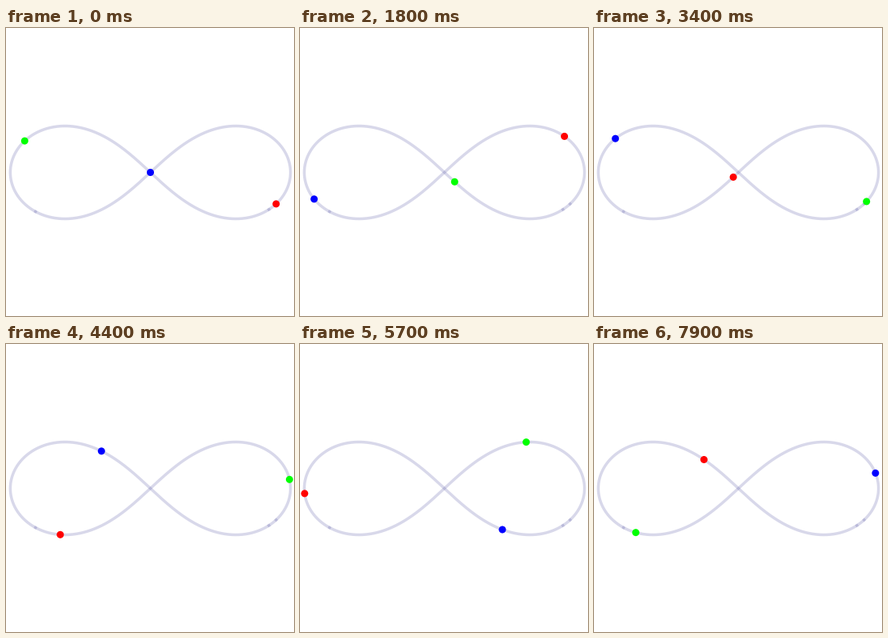
Recreate the animation shown at these times as a matplotlib script. Size 360 by 360 pixels, loop 8 s.

```python
"""Three equal masses chasing each other along the figure-eight orbit."""
import numpy as np
import matplotlib.pyplot as plt
from matplotlib.animation import FuncAnimation
from matplotlib.patches import Circle

SIZE, DPI = 360, 72          # at 72 dpi one point equals one pixel
FRAMES, INTERVAL = 80, 100
PERIOD = 6.32591398          # orbital period, G = m = 1
ORBIT_FRAMES = 100           # frames per full orbit
SUBSTEPS = 20
SCALE, CENTER = 162.0, 180.5
TRACK = (0.247, 0.24, 0.6)


def accel(z):
    """Gravitational pull on each body; positions are complex numbers."""
    d = z[None, :] - z[:, None]
    r = np.abs(d) + np.eye(3)
    return (d / r**3).sum(axis=1)


def integrate(z, v, dt, steps):
    """Fourth-order Runge-Kutta; returns positions at every step."""
    out = [z]
    for _ in range(steps):
        a1 = accel(z)
        v2 = v + a1 * dt / 2
        a2 = accel(z + v * dt / 2)
        v3 = v + a2 * dt / 2
        a3 = accel(z + v2 * dt / 2)
        v4 = v + a3 * dt
        a4 = accel(z + v3 * dt)
        z = z + dt / 6 * (v + 2 * v2 + 2 * v3 + v4)
        v = v + dt / 6 * (a1 + 2 * a2 + 2 * a3 + a4)
        out.append(z)
    return np.array(out)


start = 0.97000436 - 0.24308753j
kick = -0.93240737 - 0.86473146j
steps = ORBIT_FRAMES * SUBSTEPS
orbit = integrate(np.array([start, -start, 0]),
                  np.array([-kick / 2, -kick / 2, kick]),
                  PERIOD / steps, steps) * SCALE

fig = plt.figure(figsize=(SIZE / DPI, SIZE / DPI), dpi=DPI, facecolor="white")
ax = fig.add_axes([0, 0, 1, 1])
ax.set_xlim(-CENTER, SIZE - CENTER)
ax.set_ylim(CENTER - SIZE, CENTER)
ax.axis("off")

# The track is three translucent strokes, so crossing and joints look darker.
track = orbit[:, 0]
joints = [np.abs(track - p).argmin() for p in (-143.5 - 48.5j, 148 - 46j)]
cuts = [0, *joints, steps]
for a, b in zip(cuts, cuts[1:]):
    part = track[a:b + 1]
    ax.plot(part.real, part.imag, color=TRACK, alpha=0.2, lw=3.5,
            solid_capstyle="projecting", solid_joinstyle="round")

bodies = [ax.add_patch(Circle((0, 0), 4.5, fc=c, ec="none", zorder=3))
          for c in ("#ff0000", "#00ff00", "#0000ff")]


def update(frame):
    for body, z in zip(bodies, orbit[frame * SUBSTEPS]):
        body.center = z.real, z.imag
    return bodies


anim = FuncAnimation(fig, update, frames=FRAMES, interval=INTERVAL,
                     repeat=True, repeat_delay=0)
plt.show()
```
